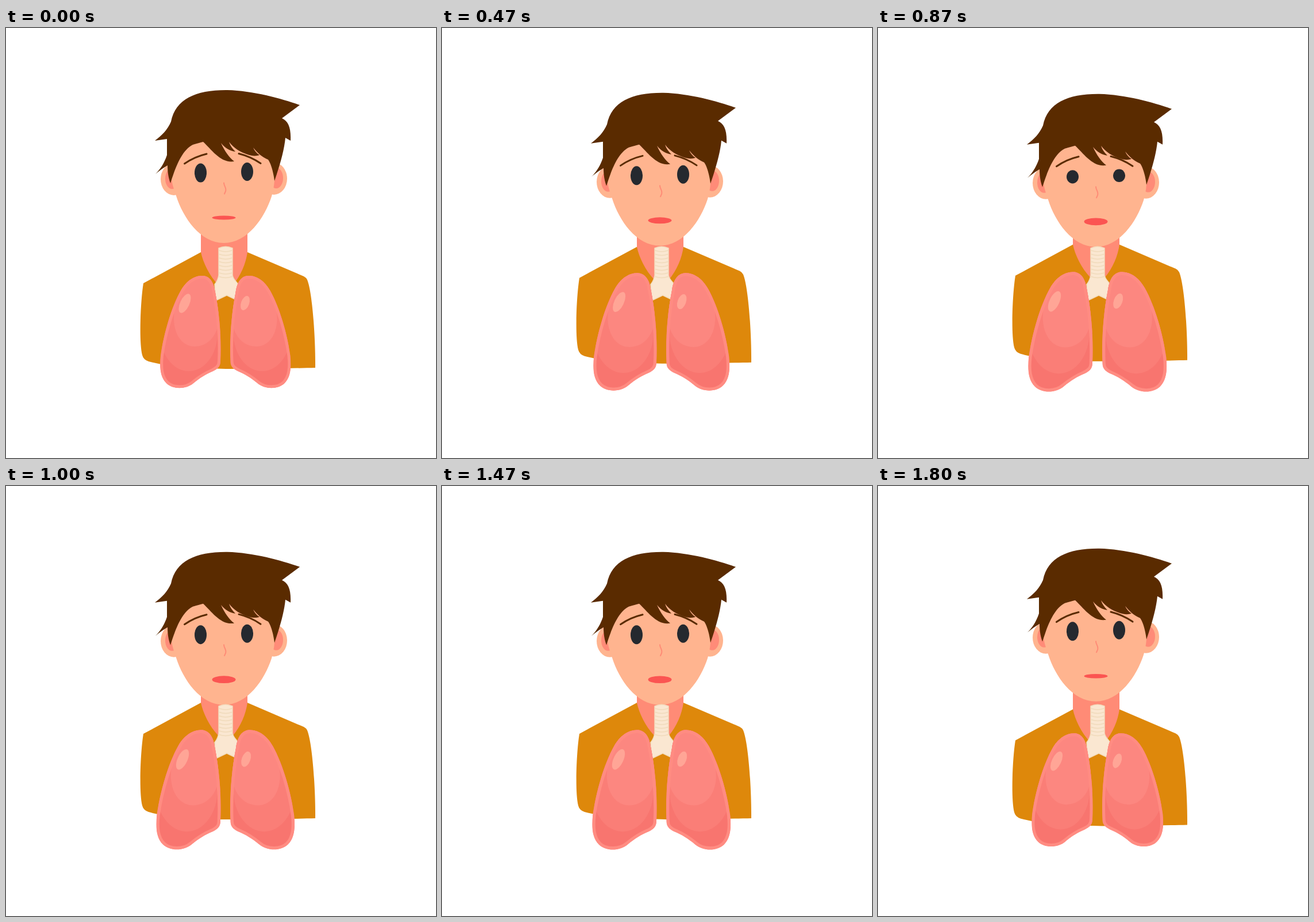
Animation of 748x748 px, one loop 1870 ms. Source, as an HTML page without scripts:

```html
<!DOCTYPE html>
<html lang="en">
<head>
<meta charset="utf-8">
<title>Breathing</title>
<style>
  @property --t { syntax: "<number>"; inherits: true; initial-value: 0; }

  html, body { margin: 0; width: 100%; height: 100%; overflow: hidden; background: #fff; }
  body { animation: clock 1870ms steps(28) -7ms infinite; }
  @keyframes clock { from { --t: 0; } to { --t: 1870; } }

  /* --d: depth of breath, three linear rises and falls; --lid: one blink */
  svg {
    display: block; width: 100%; height: 100%;
    --d: max(0,
      9.1 - .0295 * max(var(--t) - 322, 322 - var(--t)),
      8.7 - .0295 * max(var(--t) - 933, 933 - var(--t)),
      8.7 - .0295 * max(var(--t) - 1535, 1535 - var(--t)));
    --lid: min(1, .2 + .005 * max(var(--t) - 767, 767 - var(--t)));
  }
  .head { transform: translateY(calc(var(--d) * 1px)); }
  .brows { transform: translateY(calc(var(--d) * -.3px)); }
  .shirt { transform: translateY(calc(var(--d) * -1.94px)); }
  .lung { transform: scale(calc(1 + .0096 * var(--d))); }
  .left { transform-origin: 373px 531px; }
  .right { transform-origin: 390.5px 531px; }
  .eye, .mouth { transform-box: fill-box; transform-origin: center; }
  .eye { fill: #25292f; transform: scaleY(var(--lid)); }
  .mouth { fill: #fb5552; transform: scaleY(calc(1 + .12 * var(--d))); }
  .line { fill: none; stroke-linecap: round; }
</style>
</head>
<body>
<svg viewBox="0 0 748 748">
  <defs>
    <path id="lobe" d="M343 431C356 432 362 445 364 460C371 495 375 540 373 580C373 589 368 593 360 597C348 602 338 608 326 618C313 629 290 629 279 618C268 607 267 590 269 570C274 534 287 487 304 457C313 441 327 430 343 431Z"/>
    <clipPath id="inside"><use href="#lobe"/></clipPath>
    <g id="lung">
      <g clip-path="url(#inside)">
        <use href="#lobe" fill="#f8756f"/>
        <path d="M265 425H375V530H368A50 67 0 0 1 268 530H265Z" fill="#fa7e77"/>
        <path d="M292 505C292 535 308 554 328 554C350 554 366 537 370 512V425H318Q292 465 292 505Z" fill="#fc8780"/>
        <use href="#lobe" fill="none" stroke="#ff8c82" stroke-width="10"/>
      </g>
    </g>
  </defs>

  <path d="M339 345H420V410L400 450H362L339 410Z" fill="#ff8b76"/>

  <path class="shirt" fill="#de880b" d="M339 390L239 444C234 475 231 545 237 569Q239 577 248 580C290 592 350 593 390 593C440 592.500 500 592 538 591C538.500 540 533 460 524 438Q522 434 518 432L420 390C417 410 409 430 394 448H370C353 430 343 408 339 390Z"/>

  <g class="head">
    <g fill="#ffb48f">
      <ellipse cx="292" cy="263" rx="23" ry="28"/>
      <ellipse cx="466" cy="262" rx="23" ry="28"/>
    </g>
    <g fill="#ff8b78">
      <ellipse cx="289" cy="262" rx="12" ry="18"/>
      <ellipse cx="470" cy="261" rx="12" ry="18"/>
    </g>
    <path fill="#ffb48f" d="M290 180H470L467 265C466 278 464 286 462 293C450 330 420 374 379 374C338 374 308 330 296 292C292 280 289 272 288 262Z"/>
    <path fill="#5a2b00" d="M287 163C295 123 331 107.500 385 108C430 109 480 123 511 134L480 157C491 162 496 173 495 196L486 191C484 212 477 237 467 266C465 250 461 236 456 229C446 225 437 217 430 208C432 213 436 218 441 221C436 223 428 223 420 220C408 216 396 209 388 198C390 205 394 210 399 215C390 214 381 209 374 200C380 214 389 226 397 232C374 236 358 212 343 198C338 199 332 201 325 203C305 213 294 245 286 270C283 262 281 252 281 239C274 243 267 248 260 254C268 246 275 236 280 221V193L259 196C271 187 281 177 287 163Z"/>
    <g class="line brows" stroke="#5a2b00" stroke-width="3">
      <path d="M310.500 236C322 228 336 222 349 219"/>
      <path d="M405 218.500C419 222 432 228 443 235.500"/>
    </g>
    <ellipse class="eye" cx="338.500" cy="252" rx="10.500" ry="16.500"/>
    <ellipse class="eye" cx="419.500" cy="250" rx="10.500" ry="16"/>
    <path class="line" stroke="#ff8b76" stroke-width="2" d="M379 269.500C379 275 384 278 382 284L380 288.500"/>
    <ellipse class="mouth" cx="379" cy="330" rx="20.500" ry="3.500"/>
  </g>

  <path fill="#fae7d1" stroke="#f3dcbd" stroke-width="1.500" stroke-linejoin="round" d="M370 383Q382 377.500 394 383V430C395 437 401 441 404 446L403 474L384 465L365 474L363 446C367 441 369 437 370 430Z"/>
  <g class="line" stroke="#f0dabb" stroke-width="1.500">
    <path id="ring" d="M371 387Q382 391 393 387"/>
    <use href="#ring" y="6.500"/>
    <use href="#ring" y="13"/>
    <use href="#ring" y="19.500"/>
    <use href="#ring" y="26"/>
    <use href="#ring" y="32.500"/>
    <use href="#ring" y="39"/>
    <use href="#ring" y="45.500"/>
  </g>

  <g class="lung left">
    <use href="#lung"/>
    <ellipse cx="311" cy="479" rx="8" ry="18" transform="rotate(25 311 479)" fill="#ffa596"/>
  </g>
  <g class="lung right">
    <use href="#lung" transform="translate(763.500) scale(-1 1)"/>
    <ellipse cx="416" cy="478.500" rx="7" ry="13" transform="rotate(20 416 478.500)" fill="#ffa596"/>
  </g>
</svg>
</body>
</html>
```
